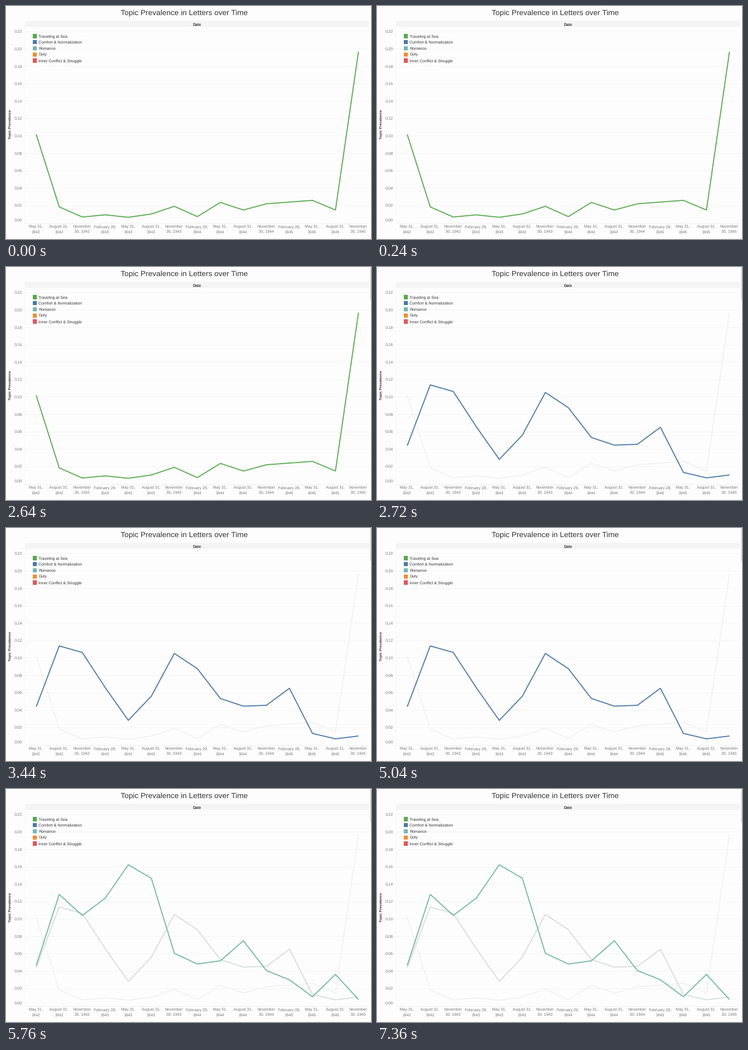
Write a matplotlib script that moves like this. It is 640 px wide and 410 px high and loops after 8000 ms.

```python
import matplotlib.pyplot as plt
from matplotlib.animation import FuncAnimation
from matplotlib.patches import Rectangle

W, H, DPI = 640, 410, 80
STEP_MS, LOOP_MS = 80, 8000
BLUE_AT, TEAL_AT, SCROLLBAR_AT = 2720, 5200, 2560

plt.rcParams.update({
    "font.family": "Liberation Sans",
    "text.hinting": "none",
    "toolbar": "None",
})

LEGEND = [
    ("Traveling at Sea", "#59a94f"),
    ("Comfort & Normalization", "#4e79a7"),
    ("Romance", "#76b7b2"),
    ("Duty", "#f28e2b"),
    ("Inner Conflict & Struggle", "#e15759"),
]

# Heights of the line vertices in stage pixels, one per quarter.
SEA = [226, 353.5, 371.3, 367.5, 371.8, 366, 352.5, 370.6,
       345.6, 359, 348, 345, 342, 359, 80.5]
COMFORT = [314.5, 207.5, 219, 281, 338.5, 296, 220.7, 247.5,
           300, 313.5, 312, 282, 361.5, 371, 366]
ROMANCE = [310.5, 185.5, 222.5, 192, 133.3, 157, 289, 308,
           302.3, 267, 319.5, 335.7, 365.5, 326.3, 370.5]
XS = [53 + 40.36 * i for i in range(15)]

fig = plt.figure(figsize=(W / DPI, H / DPI), dpi=DPI, facecolor="#fdfdfd")
ax = fig.add_axes([0, 0, 1, 1])
ax.set_xlim(0, W)
ax.set_ylim(H, 0)
ax.axis("off")


def points(px):
    return px * 72 / DPI


def label(x, y, text, px, color="#333333", ha="center", **style):
    style.setdefault("va", "baseline")
    ax.text(x, y, text, fontsize=points(px), color=color, ha=ha, **style)


def box(x, y, w, h, color):
    patch = Rectangle((x, y), w, h, facecolor=color, linewidth=0)
    ax.add_patch(patch)
    return patch


def rule(x0, y0, x1, y1, color):
    ax.plot([x0, x1], [y0, y1], color=color, lw=points(1), zorder=1)


def series(ys, zorder):
    line, = ax.plot(XS, ys, lw=points(1.8), zorder=zorder,
                    solid_joinstyle="round", solid_capstyle="butt")
    return line


def draw_frame():
    label(312, 16.6, "Topic Prevalence in Letters over Time", 13.4)
    box(33, 26, 604, 11, "#f4f4f4")
    label(335.5, 34.5, "Date", 6.9, weight="bold")
    label(7, 208, "Topic Prevalence", 6.4, weight="bold",
          rotation=90, va="center")
    rule(33, 37.5, 33, 381.5, "#f5f5f5")
    rule(33, 381.5, 637, 381.5, "#f0f0f0")
    rule(0, 408.5, W, 408.5, "#f4f4f4")


def draw_value_axis():
    for i in range(12):
        y = 381.4 - 30.6 * i
        if i:
            rule(33, y, 637, y, "#f3f3f3")
        label(29, (y if i else 376.3) + 2.5, f"{i * 0.02:.2f}", 7.1,
              "#777777", "right")


def draw_date_axis():
    months = ["May 31,", "August 31,", "November", "February"]
    for i, x in enumerate(XS):
        year = 1942 + (i + 1) // 4
        top, bottom = months[i % 4], str(year)
        if top == "November":
            bottom = f"30, {year}"
        elif top == "February":
            top += " 29," if year % 4 == 0 else " 28,"
        label(x - 0.7, 390.2, top, 6.9, "#777777")
        label(x - 0.7, 399.6, bottom, 6.9, "#777777")


def draw_legend():
    for i, (name, color) in enumerate(LEGEND):
        y = 52.8 + 10.85 * i
        box(46.5, y - 3.8, 7.6, 7.6, color)
        label(57, y + 2.5, name, 6.95, ha="left")


draw_frame()
draw_value_axis()
draw_date_axis()
draw_legend()
sea, comfort, romance = (series(ys, z) for z, ys in
                         enumerate((SEA, COMFORT, ROMANCE), start=3))
scrollbar = box(638.6, 0, 1.4, 58, "#c4c4c4")


def update(frame):
    t = frame * STEP_MS
    sea.set_color("#f0f2f0" if t >= BLUE_AT else "#5aaa50")
    comfort.set_color("#d9dddd" if t >= TEAL_AT else "#4e79a7")
    comfort.set_visible(t >= BLUE_AT)
    romance.set_color("#74b8a6")
    romance.set_visible(t >= TEAL_AT)
    fade = (t - SCROLLBAR_AT + STEP_MS) / (2 * STEP_MS)
    scrollbar.set_alpha(min(max(fade, 0), 1))
    return sea, comfort, romance, scrollbar


animation = FuncAnimation(fig, update, frames=LOOP_MS // STEP_MS,
                          interval=STEP_MS, repeat=True, repeat_delay=0)
plt.show()
```
